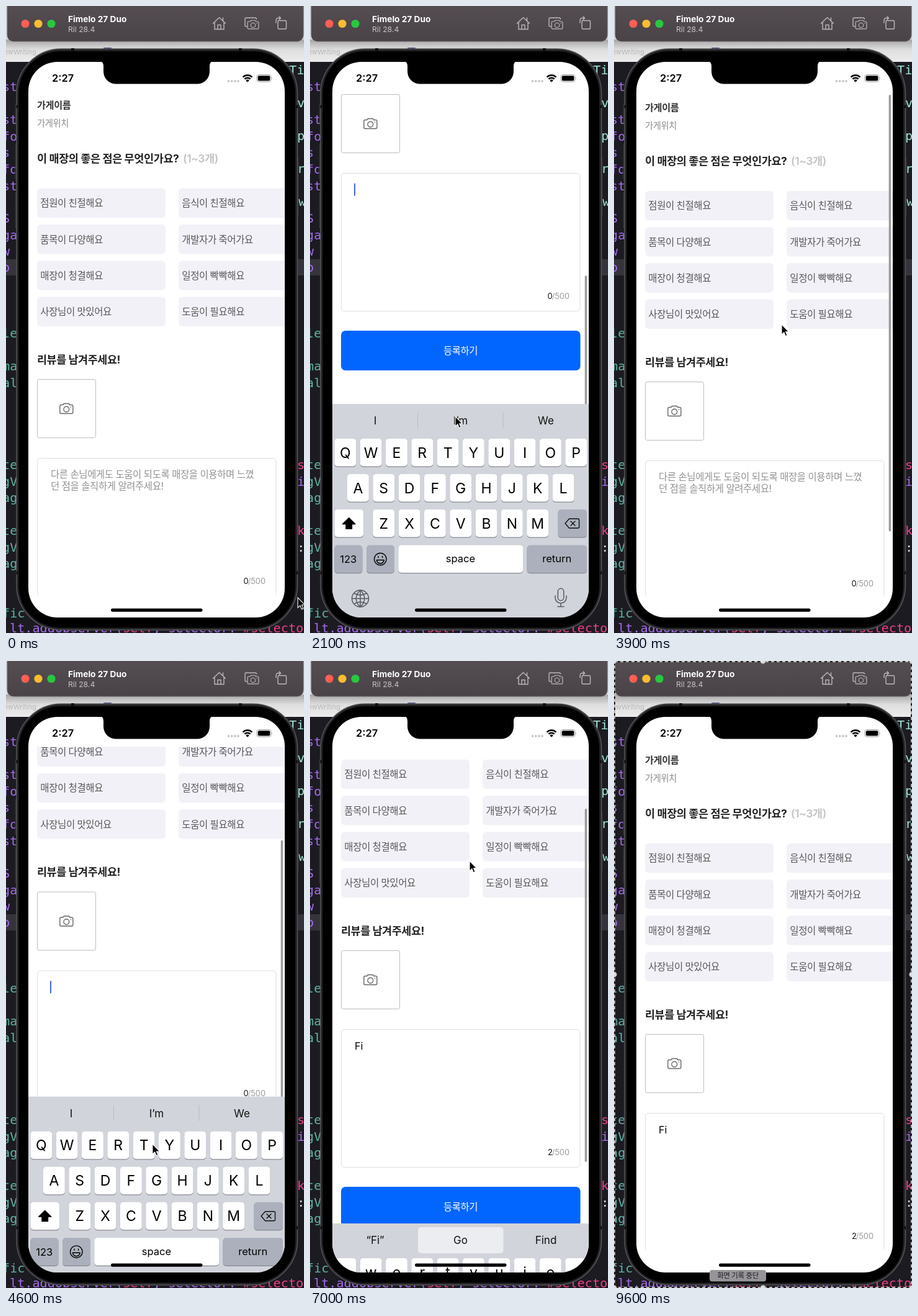
These frames come from a looping animation (480 px wide and 1010 px high, 9.97 s). An HTML page:

```html
<!DOCTYPE html>
<html lang="ko">
<head>
<meta charset="utf-8">
<title>Review form</title>
<style>
html, body { margin: 0; width: 100%; height: 100%; overflow: hidden; background: #1c1b22; }
svg { display: block; width: 480px; height: 1010px; }
text { font-family: Inter, "Noto Sans CJK KR", sans-serif; white-space: pre; }
.ko { letter-spacing: -.4px; }
.code { font-family: "DejaVu Sans Mono", "Noto Sans Mono", monospace; }
.line { fill: none; stroke-linecap: round; stroke-linejoin: round; }
</style>
</head>
<body>
<svg id="stage" viewBox="0 0 480 1010">
  <defs>
    <clipPath id="screen"><rect x="36" y="90" width="413" height="895" rx="47"/></clipPath>
    <clipPath id="view"><rect x="36" y="138" width="413" height="811"/></clipPath>
    <linearGradient id="bar" x2="0" y2="1">
      <stop stop-color="#574f54"/><stop offset="1" stop-color="#494347"/>
    </linearGradient>
    <linearGradient id="strip" x2="0" y2="1">
      <stop stop-color="#a5a5a5"/><stop offset=".45" stop-color="#dedede"/><stop offset="1" stop-color="#ececec"/>
    </linearGradient>
    <g id="camera" class="line">
      <path d="M-10.5-4.5a2 2 0 0 1 2-2h3l1.5-2h8l1.5 2h3a2 2 0 0 1 2 2v10a2 2 0 0 1-2 2h-17a2 2 0 0 1-2-2z"/>
      <circle cy=".6" r="4.4"/><path d="M7-3h.4"/>
    </g>
  </defs>

  <!-- editor behind the device -->
  <rect width="480" height="1010" fill="#1c1b22"/>
  <rect y="408" width="480" height="26" fill="#35343d"/>
  <g id="code"></g>
  <rect width="480" height="56" fill="#d9dbe0"/>
  <rect y="54" width="480" height="36" fill="url(#strip)"/>
  <rect x="157" y="67" width="13" height="5" rx="1" fill="#4b4a80"/>

  <!-- window bar -->
  <rect x="2" y="-12" width="477" height="69" rx="10" fill="url(#bar)" stroke="#6b6468"/>
  <circle cx="31" cy="28.5" r="6.6" fill="#ff5f57"/>
  <circle cx="52" cy="28.5" r="6.6" fill="#febc2e"/>
  <circle cx="73" cy="28.5" r="6.6" fill="#28c840"/>
  <g class="line" stroke="#bdb7bb" stroke-width="1.4">
    <path d="M333.500 28l10-9.500 10 9.500M336 26v11.500h15V26M341 37v-6.500h5V37M349.500 23v-4"/>
    <path d="M388 33h-1a2 2 0 0 1-2-2V21a2 2 0 0 1 2-2h14.500a2 2 0 0 1 2 2"/>
    <use href="#camera" transform="translate(398 30.500) scale(.85)"/>
    <rect x="438" y="23.500" width="13.500" height="13.500" rx="1.500"/>
    <path d="M435 27v-4a3.500 3.500 0 0 1 3.500-3.500h4M440 17l2.500 2.500-2.500 2.500"/>
  </g>

  <!-- device -->
  <g fill="#2f2f32">
    <rect x="14.500" y="158" width="5" height="30" rx="1"/><rect x="14.500" y="222" width="5" height="58" rx="1"/>
    <rect x="14.500" y="300" width="5" height="58" rx="1"/><rect x="467" y="244" width="4.500" height="94" rx="1"/>
  </g>
  <rect x="17" y="69" width="452.500" height="936" rx="72" fill="#222224" stroke="#56565a" stroke-width="1.500"/>
  <rect x="20.500" y="73" width="445.500" height="928.500" rx="67"/>
  <path d="M105 70.500h5M375 70.500h5M16.500 162h3M467 162h3M16.500 913h3M467 913h3" stroke="#111" stroke-width="5"/>

  <g clip-path="url(#screen)">
    <rect x="36" y="90" width="413" height="895" fill="#fff"/>
    <g clip-path="url(#view)">
      <g id="page"></g>
      <rect id="thumb" x="442.700" width="3.300" rx="1.600" fill="#999"/>
    </g>
    <g id="kb"></g>
    <path d="M150 89q7 0 7 8v8.500a20 20 0 0 0 20 20h131a20 20 0 0 0 20-20V97q0-8 7-8z"/>
    <rect x="169" y="970.500" width="147.500" height="5.200" rx="2.600"/>
    <g fill="#c9c9cc"><circle cx="358.500" cy="121" r="1.900"/><circle cx="363.700" cy="121" r="1.900"/><circle cx="368.900" cy="121" r="1.900"/><circle cx="374" cy="121" r="1.900"/></g>
    <g class="line" stroke="#000" stroke-width="2.400" style="stroke-linecap:butt">
      <path d="M381.500 114.600a10.600 10.600 0 0 1 15 0M384.300 117.600a6.800 6.800 0 0 1 9.400 0"/>
    </g>
    <path d="M389 122.800l-2.800-2.900a4 4 0 0 1 5.600 0z"/>
    <rect x="404" y="110.500" width="23" height="11.600" rx="3.500" fill="none" stroke="#999"/>
    <rect x="405.700" y="112.200" width="19.600" height="8.200" rx="2"/>
    <path d="M428.300 114.500q1.700 1.800 0 3.700z" fill="#999"/>
  </g>

  <path id="cursor" d="M0 0v16.300l3.800-3.500 2.500 5.900 2.700-1.100-2.500-5.800h5.100z" stroke="#fff" stroke-width="1.100"/>

  <!-- recording selection -->
  <g id="select">
    <rect x="1" y="1" width="478" height="1008" fill="none" stroke="#222" stroke-width="2"/>
    <rect x="1" y="1" width="478" height="1008" fill="none" stroke="#e8e8e8" stroke-width="1.500" stroke-dasharray="5 4"/>
    <g id="handles" fill="#ddd" stroke="#777"></g>
  </g>
  <g id="tip"><rect x="154" y="981" width="91" height="18.500" rx="4" fill="#97959a"/></g>
</svg>
<script>
const LOOP = 9970, STEP = 100, NS = 'http://www.w3.org/2000/svg';
const $ = id => document.getElementById(id);

function add(parent, tag, attrs, content) {
  const el = document.createElementNS(NS, tag);
  for (const k in attrs) el.setAttribute(k, attrs[k]);
  if (content) el.textContent = content;
  return parent.appendChild(el);
}
// text placed by its vertical centre
function label(parent, x, cy, size, content, fill = '#000', more = {}) {
  return add(parent, 'text', { x, y: cy + size * .36, 'font-size': size, fill, ...more }, content);
}
function box(parent, x, y, width, height, rx, fill, more = {}) {
  return add(parent, 'rect', { x, y, width, height, rx, fill, ...more });
}
function icon(parent, d, x, y, more = {}) {
  return add(parent, 'path', { d, transform: `translate(${x} ${y})`, ...more });
}
const mid = { 'text-anchor': 'middle' };
const ko = (weight = 400, more = {}) => ({ class: 'ko', 'font-weight': weight, ...more });
const show = (el, on) => el.style.display = on ? '' : 'none';

// --- editor and window bar
const code = (x, cy, s, fill) => label($('code'), x, cy, 20.2, s, fill, { class: 'code' });
const purple = '#a56ce8', teal = '#5fb5a2', mint = '#9fe3d3', pink = '#ef3f86';
'st  st fo s fo st  S ga w p   le  ma al     te gV ag  te gV ag   fic'
  .split(' ').forEach((s, i) => {
    const rows = [130, 0, 183, 210, 236, 263, 290, 0, 342, 369, 395, 421, 0, 0, 527, 0, 580, 607,
      0, 0, 0, 0, 739, 766, 792, 0, 845, 872, 898, 0, 0, 978];
    if (s) code(-6, rows[i], s, i < 12 ? purple : teal);
  });
[['Ti', 456, 103, mint], ['v', 469, 156, mint], ['p', 469, 209, mint], ['r', 469, 262, mint],
 ['w', 471, 315, mint], ['s', 469, 739, pink], ['i', 469, 766, purple], ['k', 469, 845, pink],
 [':', 469, 872, '#ddd']].forEach(([s, x, y, c]) => code(x, y, s, c));
code(6, 1002, 'lt.addObserver(', purple);
code(188, 1002, 'self', pink);
code(237, 1002, ', selector:', purple);
code(382, 1002, '#selecto', pink);
const stage = $('stage'), front = document.createElementNS(NS, 'g');
stage.insertBefore(front, $('cursor'));
label(front, 100, 21, 13.7, 'Fimelo 27 Duo', '#fff', { 'font-weight': 700 });
label(front, 100, 37.5, 12.2, 'Ril 28.4', '#c8c2c6');
label(front, 74, 116.5, 16.5, '2:27', '#000', { 'font-weight': 600 });
label(front, -6, 74.5, 11, 'iewWriting', '#b9b9b9');
stage.insertBefore(front.lastChild, document.querySelector('rect[fill="#222224"]'));

// --- scrolling form
const page = $('page');
label(page, 50, 160, 15.2, '가게이름', '#333', ko(700));
label(page, 50, 189, 14.3, '가게위치', '#8a8a8a', ko());
label(page, 50, 246, 17.5, '이 매장의 좋은 점은 무엇인가요?', '#222', ko(700));
label(page, 285, 246, 17.5, '(1~3개)', '#c4c4c7', ko(600));
['점원이 친절해요', '음식이 친절해요', '품목이 다양해요', '개발자가 죽어가요',
 '매장이 청결해요', '일정이 빡빡해요', '사장님이 맛있어요', '도움이 필요해요'].forEach((s, i) => {
  const x = i % 2 ? 278 : 50, y = 293.7 + (i >> 1) * 58.3;
  box(page, x, y, 207, 47.5, 6, '#f2f1f8');
  label(page, x + 5.3, y + 24, 15.5, s, '#58585a', ko(500));
});
label(page, 50, 569.5, 17.4, '리뷰를 남겨주세요!', '#222', ko(700));
box(page, 50.5, 601.5, 94, 94, 3, '#fff', { stroke: '#bdbdbd' });
add(page, 'use', { href: '#camera', transform: 'translate(97.300 649)', stroke: '#666', 'stroke-width': 1.4 });
box(page, 50.5, 728.5, 384.500, 222, 5, '#fff', { stroke: '#dedede' });
const hint = add(page, 'g');
label(hint, 72, 754.5, 15.45, '다른 손님에게도 도움이 되도록 매장을 이용하며 느꼈', '#929292', ko());
label(hint, 72, 773.5, 15.45, '던 점을 솔직하게 알려주세요!', '#929292', ko());
const typed = label(page, 72, 755, 16, '');
const caret = box(page, 71, 744.5, 2, 20.5, 1, '#4468d6');
const count = label(page, 390.7, 926, 12.8, '0', '#111', { 'text-anchor': 'end' });
label(page, 418, 926, 12.8, '/500', '#999', { 'text-anchor': 'end' });
box(page, 50, 982, 385.500, 64, 7, '#0066ff');
label(page, 242.5, 1014, 15.4, '등록하기', '#fff', ko(500, mid));

// --- keyboard, drawn from its own top edge
const kb = $('kb'), grey = '#abb0bc', PITCH = 41.32;
box(kb, 36, 0, 413, 360, 0, '#d1d4da');
const lines = add(kb, 'path', { d: 'M173.500 14v25M311 14v25', stroke: '#b9bcc4' });
const pick = box(kb, 174, 6, 137.500, 42, 5, '#ebedf0');
const words = [105, 242.5, 380].map(x => label(kb, x, 27, 17, ' ', '#111', mid));
function key(x, y, w, fill = '#fff') {
  box(kb, x, y + 1.2, w, 44.5, 5, '#888b92');
  return box(kb, x, y, w, 44.5, 5, fill);
}
const letters = [];
[['QWERTYUIOP', 39.4, 56], ['ASDFGHJKL', 60, 113], ['ZXCVBNM', 101.3, 170]].forEach(([row, x0, y]) =>
  [...row].forEach((ch, i) => {
    const x = x0 + i * PITCH;
    key(x, y, 34.8);
    letters.push({ ch, el: label(kb, x + 17.4, y + 22.5, 23, ch, '#000', mid) });
  }));
const shift = key(39.4, 170, 46.5);
const arrow = icon(kb, 'M0-9.500l10.200 10h-5.400v7.500h-9.600V.5h-5.400z', 62.7, 193, { stroke: '#000', 'stroke-width': 1.3, 'stroke-linejoin': 'round' });
key(399.5, 170, 46.5, grey);
icon(kb, 'M-11.500 0l6.500-7.500h14q2 0 2 2v11q0 2-2 2h-14zM-2.500-3.500l7 7M4.500-3.500l-7 7', 422.5, 192.5, { class: 'line', stroke: '#111', 'stroke-width': 1.4 });
key(39.4, 227.5, 45, grey);
label(kb, 61.8, 250, 16.5, '123', '#000', mid);
key(91, 227.5, 45, grey);
const face = { class: 'line', stroke: '#000', 'stroke-width': 1.4 };
add(kb, 'circle', { cx: 113.3, cy: 250, r: 9.8, ...face });
icon(kb, 'M-6 1.500h12q-1 5.500-6 5.500t-6-5.500zM-3.300-4.500v2M3.300-4.500v2', 113.3, 250, face);
key(142.3, 227.5, 201);
label(kb, 242.5, 249, 16.5, 'space', '#000', mid);
key(349.5, 227.5, 96.5, grey);
label(kb, 397.7, 249, 16.5, 'return', '#000', mid);
const soft = { class: 'line', stroke: '#555960', 'stroke-width': 1.5 };
icon(kb, 'M-13.500 0a13.500 13.500 0 1 0 27 0a13.500 13.500 0 1 0-27 0zM0-13.500v27M-13.500 0h27M0-13.500c-9 8-9 19 0 27c9-8 9-19 0-27M-10-8.500q10 6 20 0M-10 8.500q10-6 20 0', 81, 313.5, soft);
icon(kb, 'M-4.700-10a4.700 4.700 0 0 1 9.400 0V0a4.700 4.700 0 0 1-9.400 0zM-9-3v3a9 9 0 0 0 18 0v-3M0 9v5.500M-5 14.500h10', 404, 312, soft);
const pop = add(kb, 'g');
icon(pop, 'M-31-61q0-8 8-8h46q8 0 8 8v40c0 14-13.500 12-13.500 28v32q0 5-5 5h-25q-5 0-5-5v-32c0-16-13.500-14-13.500-28z', 0, 0,
  { fill: '#fff', style: 'filter:drop-shadow(0 1px 2px #0005)' });
const popChar = label(pop, 0, -38, 33, 'F', '#000', mid);

// --- overlay
for (const [cx, cy] of [[0, 0], [240, 0], [480, 0], [0, 505], [480, 505], [0, 1010], [240, 1010], [480, 1010]])
  add($('handles'), 'circle', { cx, cy, r: 4.5 });
label($('tip'), 199.5, 990, 11.5, '화면 기록 중단', '#1c1c1e', ko(400, mid));

// --- motion: smooth curve through [time, value] points without overshoot
function track(pts, t, n = 1) {
  const last = pts.length - 1;
  if (t <= pts[0][0]) return pts[0][n];
  if (t >= pts[last][0]) return pts[last][n];
  const i = pts.findIndex(p => p[0] > t) - 1;
  const slope = k => (pts[k + 1][n] - pts[k][n]) / (pts[k + 1][0] - pts[k][0]);
  const tangent = k => {
    if (k < 1 || k >= last) return 0;
    const a = slope(k - 1), b = slope(k);
    return a * b > 0 ? 2 * a * b / (a + b) : 0;
  };
  const h = pts[i + 1][0] - pts[i][0], u = (t - pts[i][0]) / h, v = 1 - u;
  return v * v * (1 + 2 * u) * pts[i][n] + u * u * (3 - 2 * u) * pts[i + 1][n]
    + h * u * v * (v * tangent(i) - u * tangent(i + 1));
}
const scroll = [[500, 0], [1050, 113], [1700, 113], [2050, 459], [2800, 459], [3100, 200], [3500, -30],
  [3900, -4], [4100, 0], [4400, 0], [4800, 459], [6600, 459], [7000, 135], [7500, 0]];
const rise = [[1700, 0], [1900, 250], [2100, 343], [2250, 355], [2800, 355], [3250, 0], [4350, 0],
  [4550, 250], [4750, 343], [4900, 355], [6600, 355], [7000, 78], [7200, 0]];
const pad = [[1700, 0], [1800, 346], [2900, 346], [3300, 0], [4350, 0], [4450, 346], [6700, 346], [7000, 221], [7300, 0]];
const fade = [[400, 0], [500, 1], [2300, 1], [2600, 0], [2700, 0], [2800, 1], [5000, 1], [5300, 0],
  [6500, 0], [6600, 1], [7900, 1], [8200, 0]];
const pointer = [[0, 470, 953], [500, 275, 760], [600, 275, 760], [1100, 271, 647], [1600, 234, 661],
  [2100, 234, 661], [2600, 265, 310], [2750, 265, 310], [3400, 270, 513], [4000, 270, 513],
  [4300, 240, 780], [4450, 240, 780], [5000, 212, 766], [5300, 204, 759], [5500, 204, 759],
  [5900, 346, 709], [6100, 346, 709], [6500, 255, 215], [7000, 257, 322], [7400, 260, 420],
  [8600, 260, 420], [9200, 245, 1030]];
const within = (t, a, b) => t >= a && t < b;
const move = (el, x, y) => el.setAttribute('transform', `translate(${x} ${y})`);

function draw(t) {
  const y = track(scroll, t), up = track(rise, t), size = 921 + track(pad, t);
  move(page, 0, -y);
  move(kb, 0, 984 - up);
  show(kb, up > .5);
  move($('cursor'), track(pointer, t), track(pointer, t, 2));

  const top = 143 + 804 * Math.max(y, 0) / size;
  $('thumb').setAttribute('y', top);
  $('thumb').setAttribute('height', 804 * 808 / size + Math.min(y, 0) / 2);
  $('thumb').setAttribute('opacity', track(fade, t));

  const text = t < 5500 ? '' : t < 6100 ? 'F' : 'Fi', lower = text !== '';
  const focus = within(t, 1700, 2800) || within(t, 4350, 6600);
  typed.textContent = text;
  count.textContent = text.length;
  show(hint, !focus && !text);
  show(caret, focus);
  caret.setAttribute('x', 71 + [0, 9.5, 14][text.length]);

  for (const k of letters) k.el.textContent = lower ? k.ch.toLowerCase() : k.ch;
  shift.setAttribute('fill', lower ? grey : '#fff');
  arrow.setAttribute('fill', lower ? 'none' : '#000');
  const list = [['I', 'I’m', 'We'], ['“F”', 'For', 'From'], ['“Fi”', 'Go', 'Find']][text.length];
  words.forEach((w, i) => w.textContent = list[i]);
  show(pick, text === 'Fi');
  show(lines, text !== 'Fi');

  const first = within(t, 5300, 5500);
  show(pop, first || within(t, 5900, 6100));
  move(pop, first ? 201.3 : 346, first ? 113 : 56);
  popChar.textContent = first ? 'F' : 'i';

  show($('select'), t >= 8700);
  show($('tip'), t >= 9600);
}

const start = performance.now();
function tick() {
  const t = (performance.now() - start) % LOOP;
  draw(Math.floor(t / STEP) * STEP);
  requestAnimationFrame(tick);
}
draw(0);
requestAnimationFrame(tick);
</script>
</body>
</html>
```
